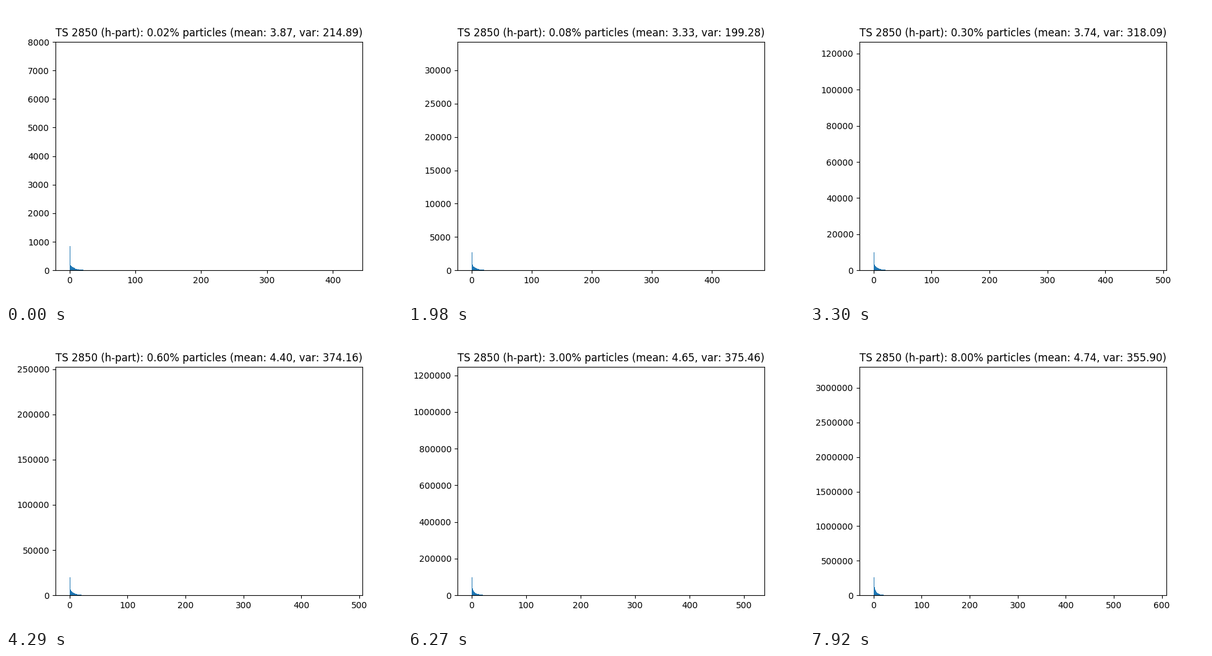
Recreate the animation shown at these times as a matplotlib script. Size 640 px wide and 480 px high, loop 8000 ms.

```python
import numpy as np
import matplotlib.pyplot as plt
from matplotlib.animation import FuncAnimation

LOOP_MS, TICK_MS, STEP_MS = 8000, 40, 330
LAST = 24
COLS = 36

# Key points: step, mean, variance, axis top per 0.01 %, largest value
KEYS = np.array([
    (0, 3.87, 214.89, 4005, 423.6),
    (6, 3.33, 199.28, 4288, 463.9),
    (10, 3.74, 318.09, 4220, 481.3),
    (13, 4.40, 374.16, 4213, 481.3),
    (16, 4.79, 456.60, 4289, 511.6),
    (19, 4.65, 375.46, 4158, 511.6),
    (LAST, 4.74, 355.90, 4134, 580.5),
])

plt.rcParams["text.kerning_factor"] = 6
fig, ax = plt.subplots(figsize=(6.4, 4.8), dpi=100)
box = ax.get_position()
left, width, height = box.x0 * 640, box.width * 640, box.height * 480
zero = left + width * 0.05 / 1.1
cols = np.arange(COLS)

bars = ax.stairs(np.zeros(COLS), np.arange(COLS + 1), fill=True, color="C0")
title = ax.set_title("")
ax.ticklabel_format(style="plain", axis="y")


def share_at(step):
    """Percentage: 0.02, 0.03 .. 0.09, 0.1, 0.2 .. 0.9, 1, 2 .. 8."""
    decade, digit = divmod(step + 1, 9)
    return (digit + 1) * 10.0 ** (decade - 2)


def stats_at(step):
    """Eased mean, variance and density; the largest value jumps."""
    steps = KEYS[:, 0]
    mean, var, density = (np.interp(step, steps, KEYS[:, i]) for i in (1, 2, 3))
    span = KEYS[np.argmin(abs(steps - step)), 4]
    return mean, var, density, span


def column_heights(step, scale):
    """Pixel heights of the histogram's one-pixel columns."""
    h = 8 * np.exp(-cols / scale / 8)
    h += (1 + 5 * (step / LAST) ** 2) * np.exp(-(cols - 1) / 1.8)
    noise = np.random.default_rng(step).normal(size=COLS)
    h *= 1 + 0.1 * noise * np.sqrt(0.02 / share_at(step))
    h[0] = 29 + 10 * np.exp(-step / 2)
    return h


def draw(frame):
    step = min((frame * TICK_MS + TICK_MS - 1) // STEP_MS, LAST)
    share = share_at(step)
    mean, var, density, span = stats_at(step)
    top = density * share * 100
    scale = width / (1.1 * span)
    edges = (round(zero) + np.arange(COLS + 1) - zero) / scale
    bars.set_data(column_heights(step, scale) * top / height, edges)
    ax.set_xlim(-0.05 * span, 1.05 * span)
    ax.set_ylim(0, top)
    title.set_text(f"TS 2850 (h-part): {share:.2f}% particles "
                   f"(mean: {mean:.2f}, var: {var:.2f})")
    return bars, title


anim = FuncAnimation(fig, draw, frames=LOOP_MS // TICK_MS, interval=TICK_MS,
                     init_func=lambda: draw(0), repeat=True, blit=False)
plt.show()
```
